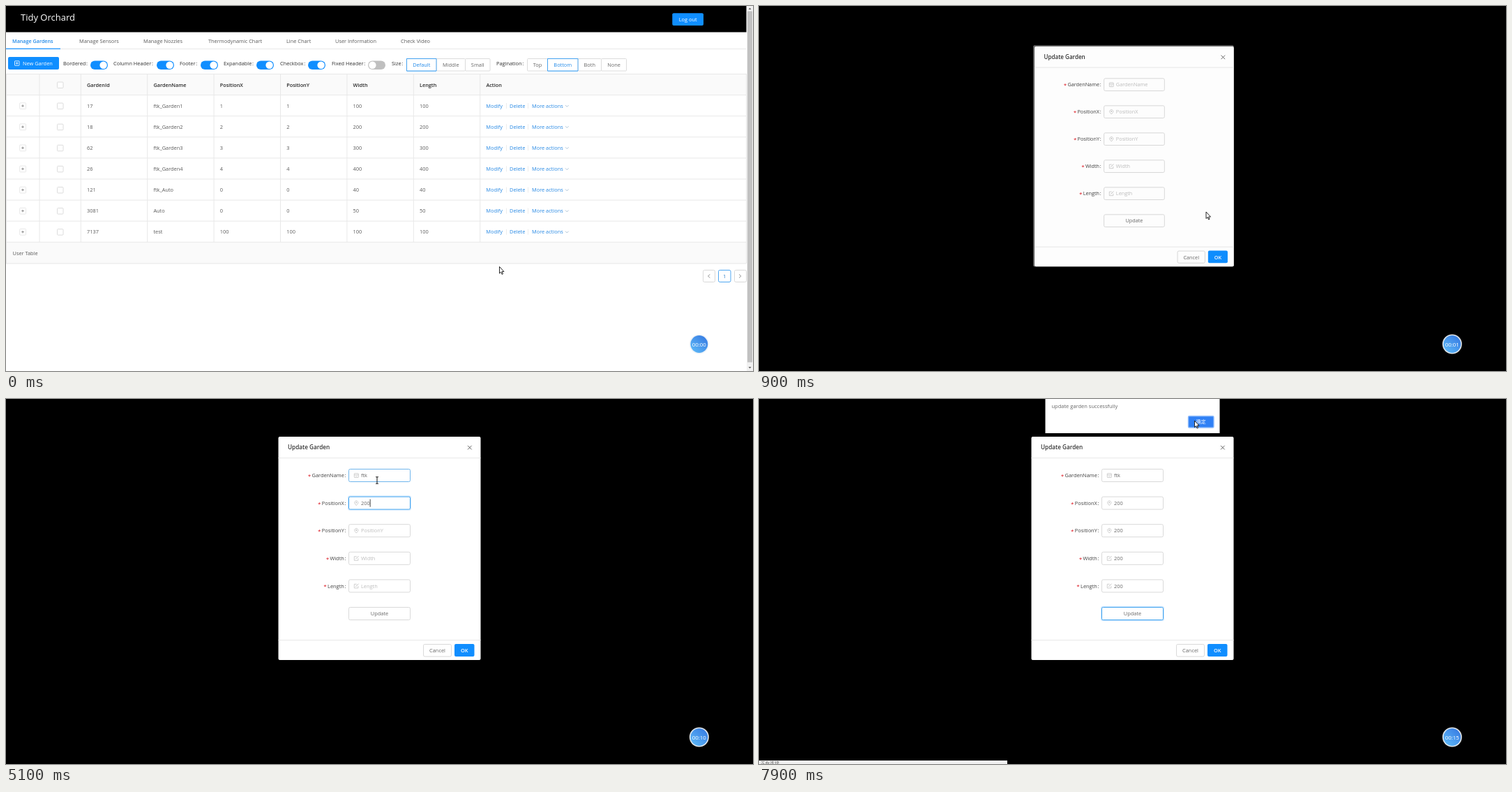
An HTML page with a canvas that plays this animation: 1071x523 px, repeating every 8 s.

```html
<!DOCTYPE html>
<html lang="en">
<head>
<meta charset="utf-8">
<title>Garden manager</title>
<style>
html, body { margin: 0; width: 100%; height: 100%; overflow: hidden; background: #000; }
canvas { display: block; width: 100vw; height: 100vh; }
</style>
</head>
<body>
<canvas id="stage"></canvas>
<script>
const W = 1071, H = 523, LOOP = 8000, STEP = 100, BLINK = 265;
const BLUE = '#108eff', LINE = '#e8e8e8', EDGE = '#d9d9d9', TEXT = '#595959', DARK = '#303030', FAINT = '#bdbdbd';
const FONT = '"Open Sans", "Noto Sans CJK SC", "Noto Sans CJK", sans-serif';
const COLON = '\u200a:';
const canvas = document.getElementById('stage');
const layer = document.createElement('canvas');
const screenCtx = canvas.getContext('2d'), layerCtx = layer.getContext('2d');
let ctx = screenCtx;

// ---- drawing helpers ----
function text(s, x, cy, { size = 7.4, color = TEXT, weight = 400, align = 'left' } = {}) {
  ctx.font = `${weight} ${size}px ${FONT}`;
  ctx.fillStyle = color;
  ctx.textAlign = align;
  ctx.fillText(s, x, cy + size * 0.36);
}
function rect(x, y, w, h, color) {
  ctx.fillStyle = color;
  ctx.fillRect(x, y, w, h);
}
function box(x, y, w, h, { fill, stroke, r = 2, lw = 1 } = {}) {
  ctx.beginPath();
  ctx.roundRect(x, y, w, h, r);
  if (fill) { ctx.fillStyle = fill; ctx.fill(); }
  if (stroke) { ctx.strokeStyle = stroke; ctx.lineWidth = lw; ctx.stroke(); }
}
function path(points, color, lw = 0.8, fill) {
  ctx.beginPath();
  points.forEach(([x, y], i) => i ? ctx.lineTo(x, y) : ctx.moveTo(x, y));
  if (fill) { ctx.closePath(); ctx.fillStyle = fill; ctx.fill(); }
  if (color) { ctx.strokeStyle = color; ctx.lineWidth = lw; ctx.stroke(); }
}
function disc(x, y, r, fill) {
  ctx.beginPath();
  ctx.arc(x, y, r, 0, 7);
  ctx.fillStyle = fill;
  ctx.fill();
}
function plus(x, y, r, color) {
  path([[x - r, y], [x + r, y]], color);
  path([[x, y - r], [x, y + r]], color);
}

// ---- garden list page ----
const COLS = [0, 47.5, 106.8, 202.2, 297.6, 393, 488.4, 583.8, 679.2, 1061];
const HEADS = ['GardenId', 'GardenName', 'PositionX', 'PositionY', 'Width', 'Length', 'Action'];
const ROWS = [
  [17, 'ftk_Garden1', 1, 1, 100, 100], [18, 'ftk_Garden2', 2, 2, 200, 200],
  [62, 'ftk_Garden3', 3, 3, 300, 300], [26, 'ftk_Garden4', 4, 4, 400, 400],
  [121, 'ftk_Auto', 0, 0, 40, 40], [3081, 'Auto', 0, 0, 50, 50], [7137, 'test', 100, 100, 100, 100]
];
const TABS = [['Manage Gardens', 9], ['Manage Sensors', 105], ['Manage Nozzles', 197], ['Thermodynamic Chart', 290],
  ['Line Chart', 402], ['User Information', 472], ['Check Video', 566]];
const SWITCHES = [['Bordered', 82, 121], ['Column Header', 154, 216], ['Footer', 249, 279],
  ['Expandable', 312, 359], ['Checkbox', 393, 433], ['Fixed Header', 467, 519]];
const TOP = 97.5, ROW = 30.1;
const rowY = i => TOP + ROW * i;

function toggle(x, on) {
  box(x, 78.5, 25, 12.5, { fill: on ? BLUE : '#bfbfbf', r: 6.25 });
  disc(on ? x + 18.6 : x + 6.4, 84.75, 5.2, '#fff');
}
function choices(names, edges, chosen) {
  const draw = i => {
    const x = edges[i] + 0.5, w = edges[i + 1] - edges[i], on = i === chosen;
    box(x, 75.5, w, 17.5, { fill: '#fff', stroke: on ? '#3a9df0' : EDGE, r: on ? 0 : 1, lw: 0.9 });
    text(names[i], x + w / 2, 84.5, { align: 'center', color: on ? '#2089e8' : '#666' });
  };
  names.forEach((_, i) => draw(i));
  draw(chosen);
}
function table(mouse) {
  rect(0, TOP, 1061, ROW, '#fafafa');
  rect(0, rowY(8), 1061, 31, '#fafafa');
  const hover = Math.floor((mouse.y - TOP) / ROW);
  if (mouse.t < 600 && hover > 0 && hover < 8) rect(0, rowY(hover), 1061, ROW, '#e6f7ff');
  for (let i = 0; i < 9; i++) rect(0, rowY(i) - 0.5, 1061, 1, LINE);
  rect(0, 368.5, 1061, 1, LINE);
  COLS.forEach(x => rect(x, 97, 1, x && x < 1061 ? 241 : 272, LINE));

  HEADS.forEach((h, i) => text(h, COLS[i + 2] + 9.2, 113, { weight: 600, size: 7.3, color: '#2a2a2a' }));
  for (let i = 0; i < 8; i++) {
    const y = rowY(i) + 15.5;
    box(73.5, y - 4, 8.5, 8.5, { fill: '#fff', stroke: EDGE, r: 1, lw: 0.9 });
    if (!i) continue;
    box(19.7, y - 4.3, 8.8, 8.8, { fill: '#fff', stroke: LINE, r: 1 });
    plus(24, y, 1.8, '#777');
    ROWS[i - 1].forEach((v, c) => text(String(v), COLS[c + 2] + 9.2, y));
    const link = { color: '#2688e4' };
    text('Modify', 688.3, y, link);
    text('Delete', 722, y, link);
    text('More actions', 754, y, link);
    rect(717, y - 4, 0.8, 8, LINE);
    rect(748, y - 4, 0.8, 8, LINE);
    path([[802, y - 1], [804.3, y + 1.3], [806.6, y - 1]], '#8aa9c4', 0.7);
  }
  text('User Table', 9.5, 354);
}
function pager() {
  box(999.5, 378.5, 17, 17, { stroke: EDGE });
  box(1021.5, 378.5, 17.5, 17, { stroke: '#3a9df0', lw: 0.9 });
  box(1044.5, 378.5, 17, 17, { stroke: EDGE });
  path([[1009.3, 384.5], [1006.5, 387], [1009.3, 389.5]], '#777');
  path([[1051, 384.5], [1053.8, 387], [1051, 389.5]], '#777');
  text('1', 1030, 387, { align: 'center', color: '#2079c8', weight: 500 });
}
function page(mouse) {
  rect(0, 0, W, H, '#fff');
  rect(0, 0, 1061.5, 37.5, '#000');
  text('Tidy Orchard', 21, 16.8, { size: 13, color: '#fff' });
  box(955.3, 10.3, 44.7, 17.7, { fill: BLUE });
  text('Log out', 977.7, 19.2, { color: '#fff', align: 'center' });

  rect(0, 61, 1061, 1, LINE);
  rect(0, 60.7, 78, 1.2, BLUE);
  TABS.forEach(([s, x], i) => text(s, x, 50.3, i ? {} : { color: '#1e88e8', weight: 600, size: 7.2 }));

  box(3, 73, 73, 18, { fill: BLUE });
  box(12.5, 78.8, 6.5, 6.5, { stroke: '#fff', r: 0.5, lw: 0.8 });
  plus(15.75, 82, 1.8, '#fff');
  text('New Garden', 24, 82, { color: '#fff', weight: 500 });

  SWITCHES.forEach(([s, x, sx], i) => {
    text(s + COLON, x, 82.3, { color: DARK });
    toggle(sx, i < 5);
  });
  text('Size' + COLON, 553, 82.3, { color: DARK });
  choices(['Default', 'Middle', 'Small'], [574, 616.5, 658, 693.5], 0);
  text('Pagination' + COLON, 703, 82.3, { color: DARK });
  choices(['Top', 'Bottom', 'Both', 'None'], [747, 776, 819.5, 853, 889], 1);
  table(mouse);
  pager();
}
function scrollbar() {
  rect(1062, 0, 9, H, '#f1f1f1');
  rect(1063, 7.5, 7, 503, '#c1c1c1');
  path([[1064.5, 5], [1066.5, 2.5], [1068.5, 5]], null, 0, '#666');
  path([[1064.5, 517], [1066.5, 519.5], [1068.5, 517]], null, 0, '#666');
}

// ---- update dialog ----
const CLICK = { x: 700, y: 322 };
const FIELDS = [
  { label: 'GardenName', icon: 'card', value: 'ftk', keys: [3400, 3500, 3700], focus: [1340, 3805] },
  { label: 'PositionX', icon: 'pin', value: '200', keys: [4880, 4980, 5080], focus: [3805, 5280] },
  { label: 'PositionY', icon: 'pin', value: '200', keys: [5380, 5480, 5580], focus: [5280, 5780] },
  { label: 'Width', icon: 'edit', value: '200', keys: [5860, 5940, 6020], focus: [5780, 6100] },
  { label: 'Length', icon: 'edit', value: '200', keys: [6180, 6280, 6380], focus: [6100, 7300] }
];
const HISTORY = ['garden5', 'test', 'ftk_Garden4', '22', 'ftk_Garden3', '111'];
const fieldY = i => 109.5 + 39.6 * i;
const typed = (f, t) => f.value.slice(0, f.keys.filter(k => k <= t).length);
const within = (t, [a, b]) => t >= a && t < b;

function icon(kind, x, y) {
  if (kind === 'card') {
    box(x - 3, y - 2.8, 6, 5.8, { stroke: FAINT, r: 0.5, lw: 0.7 });
    path([[x - 3, y - 0.8], [x + 3, y - 0.8]], FAINT, 0.7);
    path([[x - 1.5, y + 1.2], [x + 1.5, y + 1.2]], FAINT, 0.6);
  } else if (kind === 'pin') {
    ctx.beginPath();
    ctx.arc(x, y - 0.6, 2.6, 2.6, 6.82);
    ctx.lineTo(x, y + 3.4);
    ctx.closePath();
    ctx.strokeStyle = FAINT;
    ctx.lineWidth = 0.7;
    ctx.stroke();
    disc(x, y - 0.7, 0.9, FAINT);
  } else {
    path([[x + 0.5, y - 2.6], [x - 3, y - 2.6], [x - 3, y + 3], [x + 2.6, y + 3], [x + 2.6, y]], FAINT, 0.7);
    path([[x - 1, y + 1], [x + 3.2, y - 3.2]], FAINT, 0.9);
  }
}
function outline(y, focused, hovered) {
  if (focused) box(490.6, y - 9.9, 89.8, 19.8, { stroke: 'rgba(24,144,255,.25)', r: 2.5, lw: 1.2 });
  box(491.5, y - 9, 88, 18, { stroke: focused ? '#45a5ee' : hovered ? '#6fb5ec' : EDGE });
}
function field(f, i, t, mouse) {
  const y = fieldY(i), value = typed(f, t), focused = within(t, f.focus), label = f.label + COLON;
  text(label, 487.5, y, { align: 'right', color: '#404040' });
  const left = 487.5 - ctx.measureText(label).width;
  text('*', left - 5.5, y + 0.8, { color: '#e0333b', weight: 600 });
  outline(y, focused, over(mouse, y));
  icon(f.icon, 502.3, y);
  text(value || f.label, 509, y, { color: value ? '#666' : FAINT });
  if (focused) {
    const since = Math.max(f.focus[0], ...f.keys.filter(k => k <= t));
    const width = ctx.measureText(value).width;
    if (Math.floor((t - since) / BLINK) % 2 === 0) rect(509 + width, y - 5.5, 0.9, 11, '#333');
  }
}
function suggest(list, y) {
  box(491.5, y, 89, 13.35 * list.length + 0.9, { fill: '#fff', stroke: '#222', r: 0 });
  list.forEach((s, i) => text(s, 496.7, y + 7.4 + 13.35 * i, { weight: 700, size: 6.8, color: '#000' }));
}
function dialog(t, mouse) {
  box(390.5, 54, 290, 320, { fill: '#fff' });
  text('Update Garden', 404, 69.5, { weight: 600, size: 8.2, color: '#333' });
  path([[662, 66.8], [667.6, 72.4]], '#666', 1);
  path([[667.6, 66.8], [662, 72.4]], '#666', 1);
  rect(390.5, 84, 290, 1, LINE);
  rect(390.5, 345, 290, 1, LINE);
  FIELDS.forEach((f, i) => field(f, i, t, mouse));

  const hover = over(mouse, 307.5);
  outline(307.5, t >= 7300, hover);
  text('Update', 535.5, 307.5, { align: 'center', color: hover ? '#2f95ea' : '#666' });
  box(598.5, 351.5, 40, 17.5, { stroke: EDGE });
  text('Cancel', 618.5, 360.5, { align: 'center', color: '#666' });
  box(643, 351, 28.5, 18, { fill: BLUE });
  text('OK', 657.2, 360.5, { align: 'center', color: '#fff', weight: 600 });

  if (within(t, [1500, 3805])) suggest(HISTORY.filter(s => s.startsWith(typed(FIELDS[0], t))), 118.5);
  if (within(t, [6180, 7300])) suggest(['200'], 276.8);
}
// The opening dialog grows from the click point; the layer fades as one piece.
function growing(t, mouse, scale, alpha) {
  ctx = layerCtx;
  ctx.setTransform(1, 0, 0, 1, 0, 0);
  ctx.clearRect(0, 0, layer.width, layer.height);
  fitStage();
  ctx.translate(CLICK.x, CLICK.y);
  ctx.scale(scale, scale);
  ctx.translate(-CLICK.x, -CLICK.y);
  dialog(t, mouse);
  ctx = screenCtx;
  ctx.globalAlpha = alpha;
  ctx.drawImage(layer, 0, 0, W, H);
  ctx.globalAlpha = 1;
}
function notice() {
  rect(410.5, 0, 250, 49, '#fff');
  text('update garden successfully', 419.5, 10.5, { size: 7.5, color: '#666' });
  box(615.5, 24.5, 36.5, 16.5, { fill: '#2f80f5', stroke: '#8fbcfb', r: 1.5, lw: 1.4 });
  text('确定', 633.8, 32.7, { size: 7, color: '#fff', align: 'center' });
  rect(0, 518, 356, 5, '#f2f2f2');
  text('正在连接...', 2, 523, { size: 6.8, color: '#555' });
}

// ---- pointer and recording timer ----
const TRACK = [[0, 707.5, 373.5], [100, 707, 366], [400, 702, 326], [800, 700.3, 319.5], [900, 641, 295],
  [1200, 533, 116], [1300, 532, 110.5], [3800, 532, 110.5], [4000, 532, 116.5], [6600, 532, 116.5],
  [7200, 540, 306], [7600, 540, 306], [7900, 624.5, 31]];

function pointer(t) {
  let i = 1;
  while (i < TRACK.length - 1 && TRACK[i][0] < t) i++;
  const [t0, x0, y0] = TRACK[i - 1], [t1, x1, y1] = TRACK[i];
  const k = Math.min(1, (t - t0) / (t1 - t0));
  return { x: x0 + (x1 - x0) * k, y: y0 + (y1 - y0) * k, t };
}
function over({ x, y, t }, cy) {
  return t >= 900 && t < 7600 && x > 491 && x < 580 && Math.abs(y - cy) < 9;
}
function arrow(x, y) {
  path([[x, y], [x, y + 9.6], [x + 2.1, y + 7.6], [x + 3.6, y + 11], [x + 5, y + 10.4], [x + 3.6, y + 7.1],
    [x + 6.5, y + 7.1], [x, y]], '#111', 0.9, '#fff');
}
function hand(x, y) {
  path([[x, y], [x + 1.5, y], [x + 1.7, y + 4], [x + 5.6, y + 4.8], [x + 6.1, y + 6.6], [x + 5, y + 12],
    [x, y + 12], [x - 2.9, y + 7.6], [x - 1.7, y + 6.6], [x, y + 7.8], [x, y]], '#333', 0.6, '#fff');
}
function beam(x, y) {
  path([[x, y - 4.5], [x, y + 4.5]], '#111', 1);
  path([[x - 2, y - 4.8], [x + 2, y - 4.8]], '#111', 0.9);
  path([[x - 2, y + 4.8], [x + 2, y + 4.8]], '#111', 0.9);
}
function cursor(mouse) {
  const { x, y, t } = mouse;
  const link = t < 900 && y < 330;
  if (link || over(mouse, 307.5)) hand(x, y);
  else if (FIELDS.some((_, i) => over(mouse, fieldY(i)))) beam(x, y);
  else arrow(x, y);
}
function timer(t) {
  disc(993.8, 484.5, 14, t < 800 ? '#eef3f8' : '#dfe5ea');
  const g = ctx.createLinearGradient(1002, 475, 985, 494);
  g.addColorStop(0, '#3a80e4');
  g.addColorStop(1, '#5ab4f6');
  disc(993.8, 484.5, 12.4, g);
  const sec = String(Math.floor(t / 500)).padStart(2, '0');
  text('00:' + sec, 993.8, 484.7, { size: 7.9, color: '#fff', align: 'center' });
}

function draw(t) {
  const mouse = pointer(t);
  rect(0, 0, W, H, '#000');
  if (t < 900) {
    page(mouse);
    if (t >= 600) rect(0, 0, W, H, t < 800 ? 'rgba(0,0,0,.12)' : 'rgba(0,2,3,.88)');
    if (t < 800) scrollbar();
  }
  if (t >= 1000) {
    dialog(t, mouse);
  } else if (t >= 900) {
    growing(t, mouse, 0.9915, 0.4);
    growing(t, mouse, 0.985, 0.99);
  } else if (t >= 800) {
    growing(t, mouse, 0.89, 0.59);
    growing(t, mouse, 0.79, 0.8);
  }
  if (t >= 7600) notice();
  cursor(mouse);
  timer(t);
}

function fitStage() {
  ctx.setTransform(canvas.width / W, 0, 0, canvas.height / H, 0, 0);
}
function resize() {
  const d = window.devicePixelRatio || 1;
  canvas.width = layer.width = Math.round(innerWidth * d);
  canvas.height = layer.height = Math.round(innerHeight * d);
}
const start = performance.now();
function tick() {
  const t = (performance.now() - start) % LOOP;
  fitStage();
  draw(Math.floor(t / STEP) * STEP);
  requestAnimationFrame(tick);
}
addEventListener('resize', resize);
resize();
tick();
</script>
</body>
</html>
```
